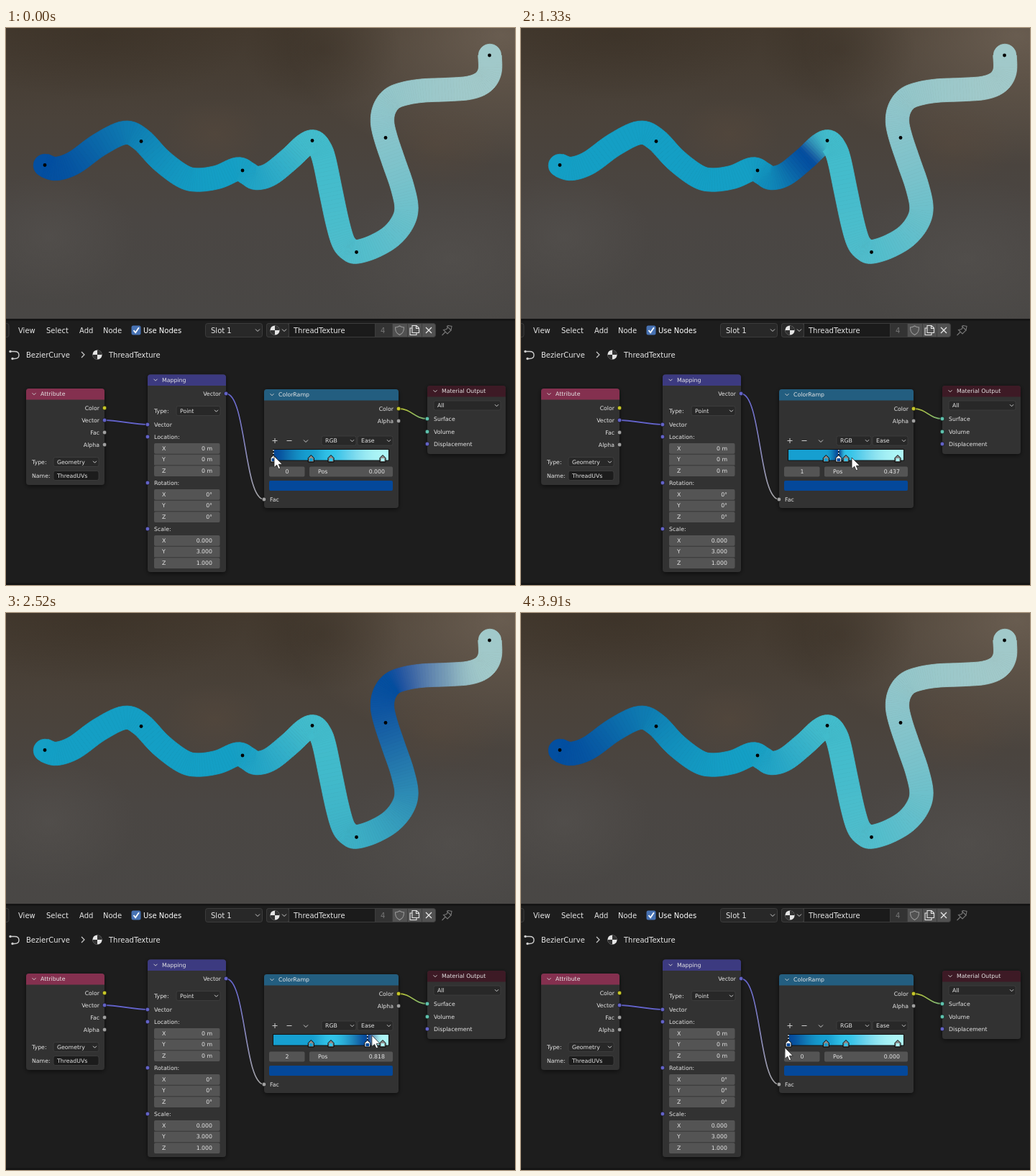
An HTML page for the animation above (3940 ms loop, 708 px wide and 774 px high).

```html
<!DOCTYPE html>
<html lang="en">
<head>
<meta charset="utf-8">
<title>Color ramp on a curve</title>
<style>
html, body { margin: 0; width: 100%; height: 100%; overflow: hidden; background: #1d1d1d; }
svg { display: block; }
text { font-family: "DejaVu Sans", sans-serif; font-size: 7.8px; fill: #e6e6e6; white-space: pre; }
.big { font-size: 10px; }
</style>
</head>
<body>
<svg id="stage" width="708" height="774" viewBox="0 0 708 774">
  <defs>
    <linearGradient id="sky" x2="0" y2="1">
      <stop stop-color="#43392e"/><stop offset=".3" stop-color="#4a423a"/>
      <stop offset=".65" stop-color="#4a4643"/><stop offset="1" stop-color="#494745"/>
    </linearGradient>
    <radialGradient id="light"><stop stop-color="#75685b" stop-opacity=".75"/><stop offset="1" stop-color="#75685b" stop-opacity="0"/></radialGradient>
    <radialGradient id="dark"><stop stop-color="#32291f" stop-opacity=".35"/><stop offset="1" stop-color="#32291f" stop-opacity="0"/></radialGradient>
    <radialGradient id="warm"><stop stop-color="#5a4a3c" stop-opacity=".4"/><stop offset="1" stop-color="#5a4a3c" stop-opacity="0"/></radialGradient>
    <radialGradient id="grey"><stop stop-color="#5b5855" stop-opacity=".4"/><stop offset="1" stop-color="#5b5855" stop-opacity="0"/></radialGradient>
    <linearGradient id="facLink" gradientUnits="userSpaceOnUse" x1="306" y1="508" x2="359" y2="655">
      <stop stop-color="#6363c7"/><stop offset="1" stop-color="#a1a1a1"/>
    </linearGradient>
    <linearGradient id="surfaceLink" gradientUnits="userSpaceOnUse" x1="546" y1="529" x2="586" y2="543">
      <stop stop-color="#b4bb34"/><stop offset="1" stop-color="#76b079"/>
    </linearGradient>
    <linearGradient id="ramp"></linearGradient>
    <filter id="shadow" x="-15%" y="-15%" width="130%" height="130%">
      <feDropShadow dx="0" dy="1.5" stdDeviation="3" flood-color="#000" flood-opacity=".6"/>
    </filter>
  </defs>
  <g id="view">
    <rect width="708" height="405" fill="url(#sky)"/>
    <ellipse cx="690" cy="10" rx="300" ry="180" fill="url(#light)"/>
    <ellipse cx="130" cy="10" rx="210" ry="90" fill="url(#dark)"/>
    <ellipse cx="440" cy="30" rx="110" ry="80" fill="url(#dark)"/>
    <ellipse cx="290" cy="148" rx="70" ry="50" fill="url(#warm)"/>
    <ellipse cx="600" cy="160" rx="90" ry="60" fill="url(#warm)"/>
    <ellipse cx="620" cy="320" rx="170" ry="110" fill="url(#grey)"/>
    <ellipse cx="60" cy="290" rx="120" ry="90" fill="url(#grey)"/>
    <g id="rope" stroke-width=".8"></g>
    <g id="dots"></g>
  </g>
  <g id="panel"></g>
  <g id="handles"></g>
  <path id="cursor" d="M0 0V15.5L3.7 12.2 6.1 17.8 8.6 16.7 6.2 11.3H11.2Z" fill="#fff" stroke="#222" stroke-width=".8"/>
</svg>
<script>
const LOOP = 3940;
const $ = id => document.getElementById(id);

// ---------- interface ----------
const PURPLE = '#6363c7', GREY = '#a1a1a1', YELLOW = '#c7c729', SHADER = '#5fc2ae';

const rect = (x, y, w, h, fill, rx = 0, extra = '') =>
  `<rect x="${x}" y="${y}" width="${w}" height="${h}" rx="${rx}" fill="${fill}" ${extra}/>`;
const label = (x, y, s, anchor = 'start', extra = '') =>
  `<text x="${x}" y="${y + 2.8}" text-anchor="${anchor}" ${extra}>${s}</text>`;
const big = (x, s, y = 420, fill = '#e6e6e6') =>
  `<text class="big" x="${x}" y="${y + 3.8}" style="fill:${fill}">${s}</text>`;
const line = (d, color = '#ccc', width = 1, extra = '') =>
  `<path d="${d}" fill="none" stroke="${color}" stroke-width="${width}" ${extra}/>`;
const chevron = (x, y, r = 2.5) => line(`M${x - r} ${y - r / 2}l${r} ${r}l${r} ${-r}`);
const socket = (x, y, color) => `<circle cx="${x}" cy="${y}" r="2.9" fill="${color}" stroke="#111" stroke-width=".7"/>`;
const output = (x, y, s, color) => label(x - 7, y, s, 'end') + socket(x, y, color);
const input = (x, y, s, color, gap = 9) => label(x + gap, y, s) + socket(x, y, color);
const dropdown = (x, y, w, s) =>
  rect(x, y - 6.5, w, 13, '#282828', 2.5, 'stroke="#404040" stroke-width=".8"') +
  label(x + 5, y, s) + chevron(x + w - 5.5, y);

function node(x, y, w, h, color, title, body) {
  return rect(x, y, w, h, '#303030', 4, 'filter="url(#shadow)"') +
    `<path d="M${x} ${y + 15.5}V${y + 4}q0-4 4-4H${x + w - 4}q4 0 4 4v11.5z" fill="${color}"/>` +
    chevron(x + 11, y + 7.5) + label(x + 20, y + 7.3, title) + body;
}

function vectorFields(title, y, values) {
  return input(197, y, title, PURPLE) + values.map((v, i) => {
    const cy = y + 16 + i * 15.6;
    return rect(206, cy - 7, 91.5, 14.8, '#545454', i == 1 ? 0 : 2) +
      label(217, cy, 'XYZ'[i]) + label(287, cy, v, 'end');
  }).join('');
}

const sphere = (x, y) =>
  `<circle cx="${x}" cy="${y}" r="6.6" fill="#e4e4e4"/>` +
  `<path d="M${x} ${y - 6.6}A6.6 6.6 0 0 1 ${x + 6.6} ${y}H${x}zM${x} ${y}V${y + 6.6}A6.6 6.6 0 0 1 ${x - 6.6} ${y}z" fill="#333"/>`;

function header() {
  const border = 'stroke="#3c3c3c"';
  return rect(0, 404, 708, 370, '#1d1d1d') + rect(0, 404, 708, 3, '#151515') +
    rect(-10, 410.5, 14, 19, '#222', 3, border) +
    big(17, 'View') + big(56, 'Select') + big(102, 'Add') + big(135, 'Node') +
    rect(174.5, 413.5, 13, 13, '#4772b3', 2.5) + line('M177.5 420l2.6 3.2 4.8-7', '#fff', 1.8) +
    big(191, 'Use Nodes', 420, '#fff') +
    rect(277.5, 410.5, 79, 19, '#282828', 3, border) + big(285, 'Slot 1') + chevron(350, 420, 3) +
    rect(362.5, 410.5, 235, 19, '#515151', 3, border) +
    rect(362.5, 410.5, 31, 19, '#282828', 3, border) +
    rect(393.5, 410.5, 120, 19, '#1b1b1b', 0, border) + rect(513.5, 410.5, 24, 19, '#333', 0, border) +
    sphere(374, 420) + chevron(387, 420, 3) + big(400, 'ThreadTexture') + big(521, '4', 420, '#777') +
    line('M558.5 411v18M578.5 411v18', '#3c3c3c') +
    line('M547.5 414q3 2 6 2c0 5-1 8-6 10.5c-5-2.5-6-5.5-6-10.5q3 0 6-2z', '#9a9a9a', 1.1) +
    line('M565 417h-3v9.500h9v-3M565 413.500h6l3.500 3.500v6.500h-9.500zM570.500 414v3.500h4', '#e6e6e6', 1.1) +
    line('M584 416l8 8m0-8l-8 8', '#e6e6e6', 1.3) +
    line('M613 414l6.500 6.500M615 413.500l5 1-1 5.500-5 5-5.500-5.500 4.500-1zM611 422.500l-4.500 4.500', '#777', 1.1) +
    line('M5.500 449.500h6.500q6 0 6 5t-6 5h-2.500', '#ccc', 1.4) +
    '<circle cx="6" cy="449.5" r="1.7" fill="#ccc"/><circle cx="9" cy="459.5" r="1.7" fill="#ccc"/>' +
    big(28, 'BezierCurve', 454) + line('M105 450l4 4-4 4', '#ccc', 1.2) + sphere(127, 454) +
    big(143, 'ThreadTexture', 454) +
    rect(0, 771, 708, 3, '#151515');
}

function nodes() {
  const attribute = output(137, 528, 'Color', YELLOW) + output(137, 545, 'Vector', PURPLE) +
    output(137, 562, 'Fac', GREY) + output(137, 579, 'Alpha', GREY) +
    label(36, 603, 'Type:') + dropdown(66, 603, 63, 'Geometry') +
    label(36, 622, 'Name:') + rect(66, 615.5, 63, 13, '#1c1c1c', 2.5, 'stroke="#404040" stroke-width=".8"') +
    label(71, 622, 'ThreadUVs');
  const mapping = output(306, 508, 'Vector', PURPLE) + label(206, 532, 'Type:') + dropdown(237, 532, 61, 'Point') +
    input(197, 551, 'Vector', PURPLE) +
    vectorFields('Location:', 568, ['0 m', '0 m', '0 m']) +
    vectorFields('Rotation:', 632, ['0°', '0°', '0°']) +
    vectorFields('Scale:', 696, ['0.000', '3.000', '1.000']);
  const colorRamp = output(546, 529, 'Color', YELLOW) + output(546, 546, 'Alpha', GREY) +
    line('M370.5 573.5h7m-3.5-3.5v7M390.5 573.5h7') + chevron(417, 574, 3) +
    dropdown(439, 573.5, 48, 'RGB') + dropdown(489, 573.5, 49, 'Ease') +
    rect(371.5, 585.5, 161, 15.5, 'url(#ramp)', 0, 'stroke="#111"') +
    rect(366, 609.5, 49.5, 14, '#545454', 2) + rect(422, 609.5, 116, 14, '#545454', 2) +
    label(391, 616.3, '0', 'middle', 'id="index"') + label(434, 616.3, 'Pos') +
    label(527, 616.3, '', 'end', 'id="pos"') +
    rect(366, 629, 172, 14, '#04489a', 2) +
    input(359, 655, 'Fac', GREY, 8);
  const material = dropdown(595, 524.5, 93, 'All') + input(586, 543, 'Surface', SHADER) +
    input(586, 561, 'Volume', SHADER) + input(586, 578, 'Displacement', PURPLE);
  const links = [['M137 545C155 545 179 551 197 551', PURPLE],
    ['M306 508C334 508 331 655 359 655', 'url(#facLink)'],
    ['M546 529C564 529 568 543 586 543', 'url(#surfaceLink)']]
    .map(([d, c]) => line(d, '#111', 3) + line(d, c, 1.8)).join('');
  const all = node(28, 501, 109, 134, '#84304f', 'Attribute', attribute) +
    node(197, 481.5, 109, 274.5, '#3c3a80', 'Mapping', mapping) +
    node(359, 502, 187, 165, '#235e80', 'ColorRamp', colorRamp) +
    node(586, 497, 109, 95, '#3d1a25', 'Material Output', material);
  return links + all;
}
$('panel').innerHTML = header() + nodes();

// ---------- rope ----------
const HALF = 16.2, STEPS = 8;
const spine = [
  [54,191],[70,195.5],[95,187],[130,162],[165,145.5],[188,155],[215,183],[245,205.5],[266,211],[295,207],
  [322,196],[336,202],[348,208.5],[368,203],[395,181.5],[415,163],[428,158],[437,168],[443,185],[452,228],
  [461,270],[469,297],[478,308],[488,311],[511,304],[535,290],[551,271],[557,250],[551,220],[539,185],
  [528,152],[523.5,130],[526.5,112],[537,98],[555,91],[580,87],[615,85.5],[645,83],[664,75],[673,60],[673,38]];
// ramp position reached at some spine points
const anchors = [[0,0],[5,.177],[14,.43],[16,.5],[23,.585],[33,.818],[35,.858],[36,.887],[38,.95],[40,1]];

function spinePoint(i, f) {
  const at = k => spine[Math.max(0, Math.min(spine.length - 1, k))];
  const [a, b, c, d] = [at(i - 1), at(i), at(i + 1), at(i + 2)];
  const axis = k => {
    const m0 = (c[k] - a[k]) / 2, m1 = (d[k] - b[k]) / 2, e = b[k] - c[k];
    const q = 2 * e + m0 + m1, r = -3 * e - 2 * m0 - m1;
    return [((q * f + r) * f + m0) * f + b[k], (3 * q * f + 2 * r) * f + m0];
  };
  const [x, dx] = axis(0), [y, dy] = axis(1), n = Math.hypot(dx, dy) || 1;
  return { x, y, nx: -dy / n * HALF, ny: dx / n * HALF };
}

const samples = [];
for (let i = 0; i < spine.length - 1; i++)
  for (let k = 0; k < STEPS; k++) samples.push(spinePoint(i, k / STEPS));
samples.push(spinePoint(spine.length - 2, 1));
let length = 0;
samples.forEach((p, i) => {
  if (i) length += Math.hypot(p.x - samples[i - 1].x, p.y - samples[i - 1].y);
  p.s = length;
});
function rampPosition(s) {
  let i = 0;
  while (i < anchors.length - 2 && s > samples[anchors[i + 1][0] * STEPS].s) i++;
  const [a, b] = [anchors[i], anchors[i + 1]];
  const s0 = samples[a[0] * STEPS].s, s1 = samples[b[0] * STEPS].s;
  return a[1] + (b[1] - a[1]) * (s - s0) / (s1 - s0);
}

function make(tag, parent, attrs) {
  const el = document.createElementNS('http://www.w3.org/2000/svg', tag);
  for (const k in attrs) el.setAttribute(k, attrs[k]);
  return parent.appendChild(el);
}
const pieces = [];
const cap = (p, u) => pieces.push({ u, el: make('circle', $('rope'), { cx: p.x, cy: p.y, r: HALF - .4 }) });
cap(samples[0], 0);
cap(samples[samples.length - 1], 1);
for (let i = 1; i < samples.length; i++) {
  const p = samples[i - 1], q = samples[i];
  const points = [p.x + p.nx, p.y + p.ny, q.x + q.nx, q.y + q.ny, q.x - q.nx, q.y - q.ny, p.x - p.nx, p.y - p.ny]
    .map(v => v.toFixed(2)).join(' ');
  pieces.push({ u: rampPosition((p.s + q.s) / 2), el: make('polygon', $('rope'), { points }) });
}
for (const [cx, cy] of [[54,190.5],[188,157.5],[329,198],[426,156.5],[487.5,311.5],[528,152.5],[672.5,38]])
  make('circle', $('dots'), { cx, cy, r: 2.4 });

// ---------- colours ----------
const linear = hex => [1, 3, 5].map(i => (parseInt(hex.slice(i, i + 2), 16) / 255) ** 2.2);
const palette = (moving, ...rest) => ({ moving: linear(moving), rest: rest.map(linear) });
const ropeColors = palette('#034fa0', '#149fc5', '#42bccc', '#a1c9ca');
const rampColors = palette('#04489a', '#169fd0', '#31c3e8', '#adf5f6');
const fixedStops = [.327, .5, .95];

function stopsFor(pos, colors) {
  return fixedStops.map((p, i) => ({ p, c: colors.rest[i] }))
    .concat({ p: pos, c: colors.moving }).sort((a, b) => a.p - b.p);
}
function colorAt(stops, u) {
  const i = stops.findIndex(s => s.p > u);
  let c;
  if (i == 0) c = stops[0].c;
  else if (i < 0) c = stops[stops.length - 1].c;
  else {
    const a = stops[i - 1], b = stops[i], f = (u - a.p) / (b.p - a.p), e = f * f * (3 - 2 * f);
    c = a.c.map((v, k) => v + (b.c[k] - v) * e);
  }
  return `rgb(${c.map(v => Math.round(255 * v ** (1 / 2.2)))})`;
}
const RAMP_STEPS = 64;
const rampStops = Array.from({ length: RAMP_STEPS + 1 }, (_, i) =>
  make('stop', $('ramp'), { offset: i / RAMP_STEPS }));

// ---------- motion ----------
const times = [0, 790, 1330, 2120, 2290, 2520, 3210, 3790, 3940];
const track = {
  pos: [0, .177, .436, .864, .9, .818, .368, 0, 0],
  x: [373, 413, 460, 523, 527, 509, 425, 368, 367],
  y: [595, 595, 597, 584, 583, 587, 604, 604, 604]
};
// monotone cubic through the keys
function sample(keys, t) {
  const slope = i => (keys[i + 1] - keys[i]) / (times[i + 1] - times[i]);
  const tangent = i => {
    if (i == 0 || i == keys.length - 1) return 0;
    const a = slope(i - 1), b = slope(i);
    return a * b <= 0 ? 0 : 2 * a * b / (a + b);
  };
  let i = 0;
  while (i < times.length - 2 && t >= times[i + 1]) i++;
  const h = times[i + 1] - times[i], f = (t - times[i]) / h, g = 1 - f;
  return keys[i] * (1 + 2 * f) * g * g + keys[i + 1] * f * f * (3 - 2 * f) +
    h * f * g * (tangent(i) * g - tangent(i + 1) * f);
}

function handle(p, color, active) {
  const x = 372 + p * 160;
  return (active ? line(`M${x} 586v8`, '#000', 1.2) + line(`M${x} 586v8`, '#fff', 1.2, 'stroke-dasharray="2 2"') : '') +
    `<path d="M${x - 4} 603v-5.5l4-4 4 4v5.5z" fill="${active ? '#eee' : '#8c8c8c'}" stroke="#000"/>` +
    rect(x - 2.3, 598, 4.6, 4, color);
}

function render(time) {
  const t = time % LOOP;
  const pos = Math.max(0, sample(track.pos, t));
  const ropeStops = stopsFor(pos, ropeColors), barStops = stopsFor(pos, rampColors);
  for (const { el, u } of pieces) {
    const c = colorAt(ropeStops, u);
    el.setAttribute('fill', c);
    el.setAttribute('stroke', c);
  }
  rampStops.forEach((el, i) => el.setAttribute('stop-color', colorAt(barStops, i / RAMP_STEPS)));
  $('handles').innerHTML = fixedStops.map(p => handle(p, colorAt(barStops, p), false)).join('') +
    handle(pos, '#04489a', true);
  $('index').textContent = fixedStops.filter(p => p < pos).length;
  $('pos').textContent = pos.toFixed(3);
  $('cursor').setAttribute('transform', `translate(${sample(track.x, t)} ${sample(track.y, t)})`);
}

const start = performance.now();
function tick() {
  render(performance.now() - start);
  requestAnimationFrame(tick);
}
tick();
</script>
</body>
</html>
```
